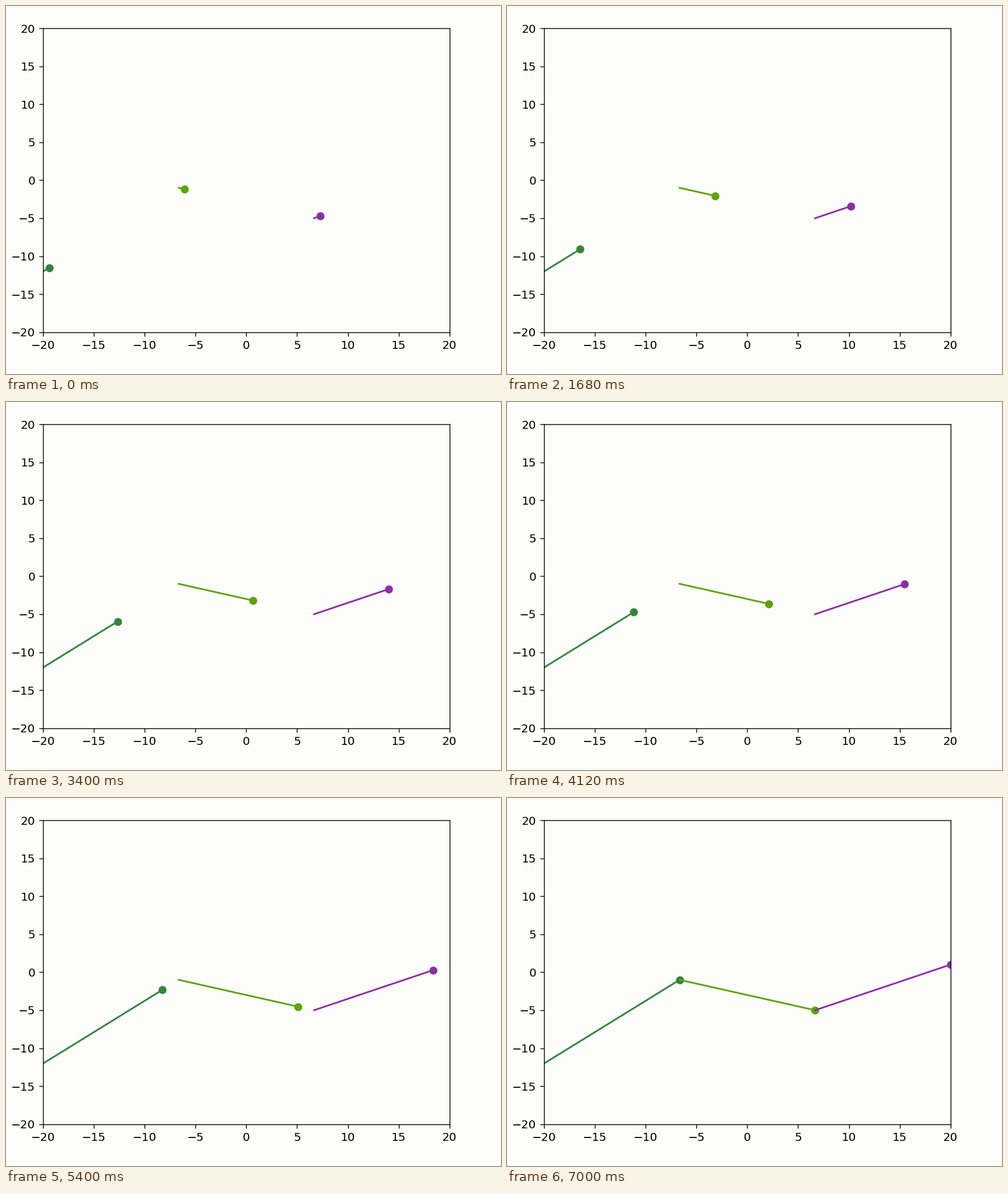
These frames come from a looping animation (868 px wide and 645 px high, 7.44 s). A matplotlib script:

```python
import numpy as np
import matplotlib.pyplot as plt
from matplotlib.animation import FuncAnimation

W, H, DPI = 868, 645, 144
INTERVAL, FRAMES = 40, 186
BG = "#fdfdfc"
COLORS = ["#34843a", "#5fa30c", "#8a30a2"]

# Joints of the polyline; each segment grows from its left joint.
JOINT_X = np.linspace(-20, 20, 4)
JOINT_Y = np.array([-12, -1, -5, 1])

# The segments advance in small steps at a slightly uneven pace.
STEP = 0.022
PACE_MS = [0, 920, 2400, 3400, 3800, 4560, 5360, 6160]
PACE_STEPS = [2.1, 7.5, 17.4, 25.5, 27.6, 34.4, 40.4, 46]

plt.rcParams.update({
    "font.family": "DejaVu Sans",
    "font.size": 10,
    "axes.linewidth": 0.72,
    "xtick.major.width": 0.72,
    "ytick.major.width": 0.72,
})

fig = plt.figure(figsize=(W / DPI, H / DPI), dpi=DPI, facecolor=BG)
left, right, top, bottom = 65.3, 777.6, 39.2, 571.6
ax = fig.add_axes([left / W, 1 - bottom / H, (right - left) / W, (bottom - top) / H],
                  facecolor=BG)
ax.set(xlim=(-20, 20), ylim=(-20, 20),
       xticks=range(-20, 21, 5), yticks=range(-20, 21, 5))

lines = [ax.plot([], [], color=c, lw=1.5, marker="o", ms=6, markevery=[1])[0]
         for c in COLORS]


def progress(ms):
    steps = np.floor(np.interp(ms, PACE_MS, PACE_STEPS))
    return min(1.0, STEP * steps)


def update(frame):
    p = progress(frame * INTERVAL)
    for i, line in enumerate(lines):
        x0, x1 = JOINT_X[i:i + 2]
        y0, y1 = JOINT_Y[i:i + 2]
        line.set_data([x0, x0 + p * (x1 - x0)], [y0, y0 + p * (y1 - y0)])
    return lines


anim = FuncAnimation(fig, update, frames=FRAMES, interval=INTERVAL,
                     init_func=lambda: update(0), repeat=True, repeat_delay=0)
plt.show()
```
